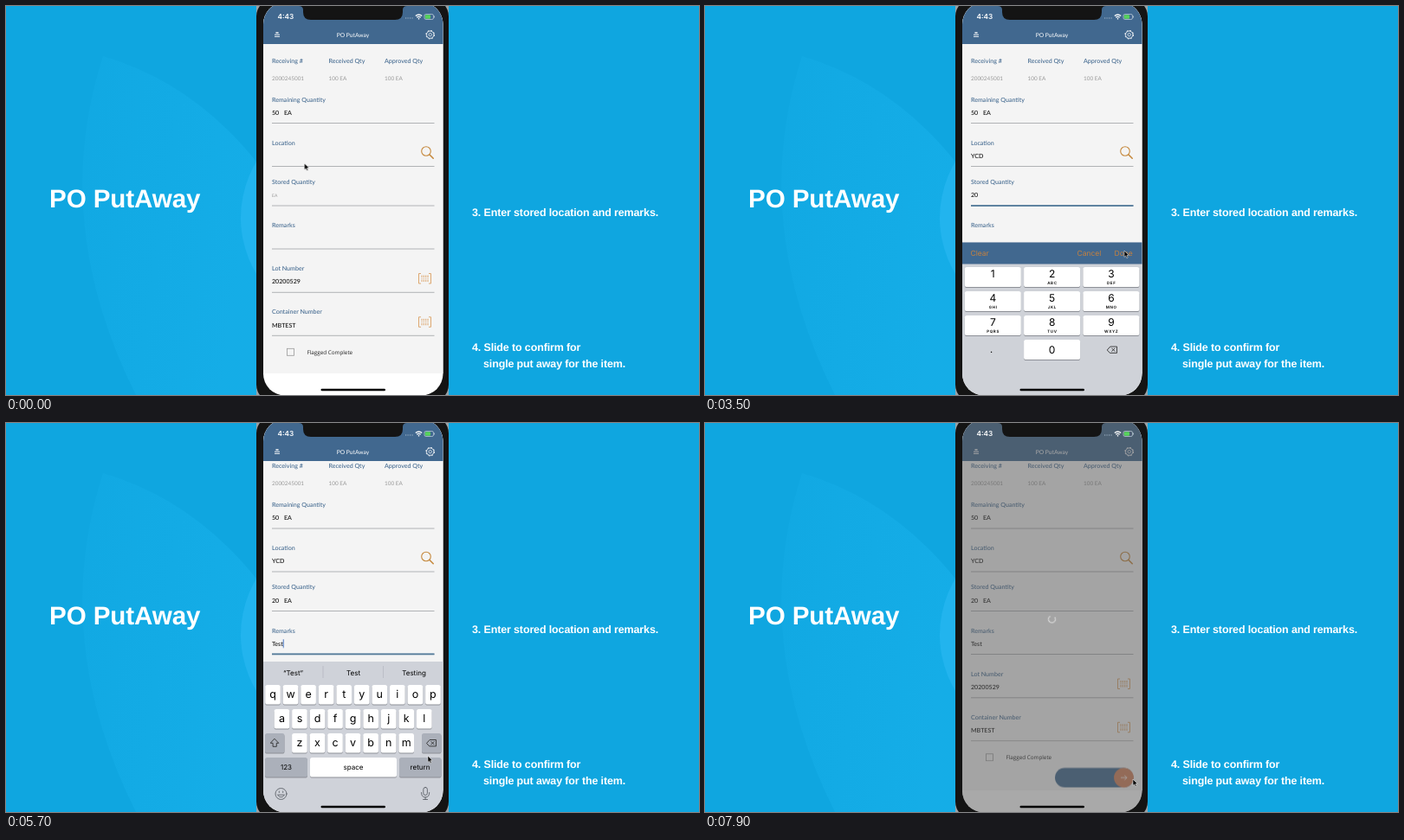
These frames come from a looping animation (800x450 px, 8000 ms). An HTML page:

```html
<!DOCTYPE html>
<html lang="en">
<head>
<meta charset="utf-8">
<title>PO PutAway</title>
<style>
html, body { margin: 0; width: 100%; height: 100%; overflow: hidden; background: #0fa6e0; }
svg { display: block; width: 800px; height: 450px; text-rendering: geometricPrecision; }
text { font-family: Lato, sans-serif; font-size: 7.1px; }
.big { font: bold 29.6px "Liberation Sans", sans-serif; fill: #fff; letter-spacing: -.1px; }
.note { font: bold 12.5px "Liberation Sans", sans-serif; fill: #fff; letter-spacing: -.14px; }
.label { fill: #41688f; font-weight: 500; }
.value { fill: #111; font-weight: 500; }
.dim { fill: #9a9a9a; font-size: 6.4px; }
.open { font-family: "Open Sans", sans-serif; font-size: 6.3px; fill: #222; }
.ui { font-family: Inter, sans-serif; }
.mid { text-anchor: middle; }
.rule { stroke: #a9abae; stroke-width: .9; }
.focus { stroke: #39698f; stroke-width: 1.4; }
.icon { fill: none; stroke: #dba063; stroke-width: .9; }
.pen { fill: none; stroke: #222; stroke-width: .8; stroke-linejoin: round; stroke-linecap: round; }

.t, .m { animation: 8s infinite; }
.t { animation-timing-function: step-end; }
.m { animation-timing-function: ease-in-out; }

@keyframes ycd { 0%, 1.2% { opacity: 0 } 8.7%, 100% { opacity: 1 } }
@keyframes unit { 0% { opacity: 1 } 31.9% { opacity: 0 } 100% { opacity: 0 } }
@keyframes two { 0% { opacity: 0 } 31.9% { opacity: 1 } 36.3% { opacity: 0 } 100% { opacity: 0 } }
@keyframes twenty { 0% { opacity: 0 } 36.3% { opacity: 1 } 100% { opacity: 1 } }
@keyframes twentyUnit { 0% { opacity: 0 } 44.9% { opacity: 1 } 100% { opacity: 1 } }
@keyframes qtyFocus { 0% { opacity: 0 } 18.6% { opacity: 1 } 44.9% { opacity: 0 } 100% { opacity: 0 } }
@keyframes noteFocus { 0% { opacity: 0 } 53.6% { opacity: 1 } 74.2% { opacity: 0 } 100% { opacity: 0 } }
@keyframes t1 { 0% { opacity: 0 } 59.4% { opacity: 1 } 62% { opacity: 0 } 100% { opacity: 0 } }
@keyframes t2 { 0% { opacity: 0 } 62% { opacity: 1 } 64.5% { opacity: 0 } 100% { opacity: 0 } }
@keyframes t3 { 0% { opacity: 0 } 64.5% { opacity: 1 } 67.4% { opacity: 0 } 100% { opacity: 0 } }
@keyframes t4 { 0% { opacity: 0 } 67.4% { opacity: 1 } 100% { opacity: 1 } }
@keyframes caret {
  0% { transform: none } 59.4% { transform: translateX(4.2px) } 62% { transform: translateX(7.8px) }
  64.5% { transform: translateX(10.6px) } 67.4%, 100% { transform: translateX(12.9px) }
}
@keyframes upper { 0% { opacity: 1 } 59.4% { opacity: 0 } 100% { opacity: 0 } }
@keyframes lower { 0% { opacity: 0 } 59.4% { opacity: 1 } 100% { opacity: 1 } }
@keyframes button { 0% { opacity: 0 } 58% { opacity: 1 } 100% { opacity: 1 } }

@keyframes scroll {
  0%, 53.3% { transform: none; animation-timing-function: linear }
  55% { transform: translateY(-2.4px); animation-timing-function: ease-out }
  58.5%, 100% { transform: translateY(-13.5px) }
}
@keyframes numpad {
  0%, 18.4% { transform: translateY(177px) }
  23.5%, 45% { transform: none }
  49.5%, 100% { transform: translateY(177px) }
}
@keyframes keyboard {
  0%, 52.5% { transform: translateY(174px); animation-timing-function: ease-in }
  55% { transform: translateY(102px); animation-timing-function: ease-out }
  58.5%, 74.2% { transform: none }
  78.7%, 100% { transform: translateY(174px) }
}
@keyframes slide { 0%, 88.7% { transform: none } 95%, 100% { transform: translateX(68px) } }
@keyframes hint { 0%, 89% { opacity: 1 } 93.5%, 100% { opacity: 0 } }
@keyframes shade { 0%, 95.3% { opacity: 0 } 97%, 100% { opacity: 1 } }
@keyframes spin { to { transform: rotate(360deg) } }
@keyframes pointer {
  0%, 1.2% { transform: translate(344.5px, 182px) }
  15%, 20% { transform: translate(332px, 227px) }
  30%, 32.5% { transform: translate(399px, 311px) }
  34.8%, 37.5% { transform: translate(399px, 394px) }
  43%, 45.5% { transform: translate(484px, 283px) }
  52%, 56% { transform: translate(337.5px, 272px) }
  58.8%, 59.8% { transform: translate(390px, 312px) }
  61.5%, 62.3% { transform: translate(349px, 312px) }
  64%, 65% { transform: translate(360px, 340px) }
  67%, 68% { transform: translate(390px, 312px) }
  71.2% { transform: translate(487px, 385px) }
  73%, 75% { transform: translate(482px, 393px) }
  81.2% { transform: translate(466.5px, 391px) }
  86%, 88.7% { transform: translate(416px, 407px) }
  95% { transform: translate(484px, 409px) }
  98.5%, 100% { transform: translate(494px, 412px) }
}
.spinner { transform-origin: 400.5px 227px; animation: spin 1s linear infinite; }
</style>
</head>
<body>
<svg viewBox="0 0 800 450">
  <defs>
    <clipPath id="screen"><rect x="297" y="-4" width="207.5" height="454.5" rx="25"/></clipPath>
    <clipPath id="page"><rect x="297" y="44" width="208" height="381"/></clipPath>
    <linearGradient id="haze" x1="0" y1="0" x2="1" y2=".3">
      <stop offset="0" stop-color="#17b0ea" stop-opacity=".25"/>
      <stop offset="1" stop-color="#17b0ea" stop-opacity=".7"/>
    </linearGradient>
  </defs>

  <rect width="800" height="450" fill="#0fa6e0"/>
  <path d="M112 58Q215 88 289 180V450H150Q50 250 112 58Z" fill="url(#haze)"/>
  <circle cx="397" cy="245" r="126" fill="#22b4ee"/>
  <rect x="511" width="289" height="450" fill="#0fa6e0"/>

  <text class="big" x="50" y="233">PO PutAway</text>
  <text class="note" x="538" y="242.5">3. Enter stored location and remarks.</text>
  <text class="note" x="538" y="399">4. Slide to confirm for</text>
  <text class="note" x="551" y="417.5">single put away for the item.</text>

  <rect x="289" width="222" height="450" fill="#9aa3a8"/>
  <rect x="289" y="-8" width="222" height="466" rx="20" fill="#141414"/>

  <g clip-path="url(#screen)">
    <rect x="297" width="208" height="450" fill="#fff"/>
    <rect x="297" width="208" height="425" fill="#f4f4f4"/>

    <g clip-path="url(#page)">
      <g class="m" style="animation-name:scroll">
        <g id="form"></g>
        <g class="icon" style="stroke:#c68a3f;stroke-width:1.1">
          <circle cx="485" cy="168" r="5.3"/>
          <path d="M489 172l4.2 4.2" stroke-width="1.6" stroke-linecap="round"/>
        </g>
        <text class="value m" x="307" y="175.7" style="animation-name:ycd">YCD</text>

        <text class="dim t" x="307" y="220.6" style="font-size:5px;animation-name:unit">EA</text>
        <text class="value t" x="307" y="221" style="animation-name:two">2</text>
        <text class="value t" x="307" y="221" style="animation-name:twenty">20</text>
        <text class="value t" x="321" y="221" style="animation-name:twentyUnit">EA</text>
        <path class="focus t" d="M307 231h187.500" style="animation-name:qtyFocus"/>

        <text class="value t" x="307" y="271.2" style="animation-name:t1">T</text>
        <text class="value t" x="307" y="271.2" style="animation-name:t2">Te</text>
        <text class="value t" x="307" y="271.2" style="animation-name:t3">Tes</text>
        <text class="value t" x="307" y="271.2" style="animation-name:t4">Test</text>
        <g class="t" style="animation-name:noteFocus">
          <path class="focus" d="M307 280.800h187.500"/>
          <rect class="t" x="306.800" y="263.500" width="1" height="10" fill="#3f6fc0" style="animation-name:caret"/>
        </g>

        <rect x="324.500" y="396.300" width="8" height="8" fill="none" stroke="#999" stroke-width=".8"/>
        <text class="open" x="347.500" y="402.800">Flagged Complete</text>

        <g class="t" style="animation-name:button">
          <rect x="404" y="412.500" width="90.500" height="22.500" rx="11.250" fill="#41688f"/>
          <text class="open m" x="432" y="426.300" style="font-size:7.25px;fill:#fff;animation-name:hint">Slide to confirm</text>
          <g class="m" style="animation-name:slide">
            <circle cx="415.500" cy="423.800" r="11.400" fill="#d3805a"/>
            <path d="M412 423.800h7m-2.700-2.700l2.700 2.700l-2.700 2.700" fill="none" stroke="#fff" stroke-width=".8"/>
          </g>
        </g>
      </g>
    </g>

    <rect x="297" width="208" height="44" fill="#41688f"/>
    <text class="mid" x="400.500" y="36" fill="#fff" style="font-size:6.7px">PO PutAway</text>
    <path d="M311.500 31h3M310 33.200h6M310 35.400h6M311.500 30.900h3" stroke="#fff" stroke-width=".9"/>
    <g fill="none" stroke="#fff">
      <circle cx="489.700" cy="33.200" r="4.200" stroke-width=".8"/>
      <circle cx="489.700" cy="33.200" r="4.800" stroke-width="1" stroke-dasharray="1.900 1.870"/>
      <circle cx="489.700" cy="33.200" r="1.700" stroke-width=".7"/>
    </g>

    <g class="m" style="animation-name:numpad">
      <rect x="297" y="273.500" width="208" height="177" fill="#cfd2d8"/>
      <rect x="297" y="273.500" width="208" height="25" fill="#41688f"/>
      <g class="ui" fill="#c5803f">
        <text class="ui" x="306.500" y="289" style="font-size:8.5px">Clear</text>
        <text class="ui" x="429.500" y="289" style="font-size:8.5px">Cancel</text>
        <text class="ui" x="472.500" y="289" style="font-size:8.5px">Done</text>
      </g>
      <g id="pad"></g>
      <text class="ui mid" x="330.500" y="400.500" style="font-size:11px">.</text>
      <path class="pen" d="M464.500 397.700l3.300-3.700h7.700v7.400h-7.700zM469.700 396l3.400 3.400m0-3.400l-3.400 3.400"/>
    </g>

    <g class="m" style="animation-name:keyboard">
      <rect x="297" y="276" width="208" height="175" fill="#cfd2d9"/>
      <g class="t" style="animation-name:t4">
        <path d="M366 281v14M435.500 281v14" stroke="#b3b7bf" stroke-width=".7"/>
        <text class="ui mid" x="331.500" y="291.500" style="font-size:8px">“Test”</text>
        <text class="ui mid" x="401" y="291.500" style="font-size:8px">Test</text>
        <text class="ui mid" x="471" y="291.500" style="font-size:8px">Testing</text>
      </g>
      <g id="keys"></g>
      <g id="upper" class="t" style="animation-name:upper"></g>
      <g id="lower" class="t" style="animation-name:lower"></g>
      <path class="pen" d="M310.200 365.500l4.600 4.800h-2.500v4h-4.200v-4h-2.500z"/>
      <path class="pen" d="M485.800 370.200l3.300-3.700h7.400v7.400h-7.400zM490.800 368.500l3.400 3.400m0-3.400l-3.400 3.400"/>
      <g class="pen" style="stroke:#50555c">
        <circle cx="317.500" cy="429" r="6.500"/>
        <path d="M313.700 430.500q3.800 5 7.600 0zM315.300 426v1.500M319.700 426v1.500"/>
        <rect x="481.800" y="421.500" width="4.600" height="9" rx="2.300"/>
        <path d="M479.500 427.500q0 5.500 4.600 5.500t4.600-5.500M484.100 433v2.500m-2.500 0h5"/>
      </g>
    </g>

    <g class="m" style="animation-name:shade">
      <rect x="297" width="208" height="450" fill="#565656" fill-opacity=".51"/>
      <g class="spinner">
        <circle cx="400.500" cy="227" r="4" fill="none" stroke="#dcdcdc" stroke-width="1.200" stroke-dasharray="19 6.130"/>
      </g>
    </g>

    <text class="ui" x="313.500" y="15.300" fill="#fff" style="font-size:8.2px;font-weight:600">4:43</text>
    <path d="M461 14h9" stroke="#a9bccf" stroke-width="1" stroke-dasharray="1.200 1.300"/>
    <g fill="none" stroke="#fff" stroke-width="1.300">
      <path d="M472.800 11.600q3.700-3.200 7.400 0M474.300 13.300q2.200-1.900 4.400 0"/>
      <path d="M476.500 14v1.400"/>
    </g>
    <rect x="483" y="9.500" width="10.500" height="6" rx="1.700" fill="none" stroke="#c9d6e2" stroke-width=".7"/>
    <rect x="483.800" y="10.300" width="6.200" height="4.400" rx="1" fill="#57d35c"/>
    <path d="M494.600 11.500v2" stroke="#c9d6e2" stroke-width=".8"/>
    <rect x="363.500" y="442.800" width="74.500" height="2.400" rx="1.200" fill="#000"/>
  </g>

  <path d="M338 0q5 0 5 4.500V7q0 9 9 9h97q9 0 9-9V4.500q0-4.500 5-4.500z" fill="#141414"/>

  <path class="m" d="M0 0v7.400l1.700-1.500 1.200 2.700 1.300-.6-1.200-2.600h2.300z" fill="#000" stroke="#fff" stroke-width=".5" style="animation-name:pointer"/>
</svg>

<script>
const put = (id, markup) => document.getElementById(id).innerHTML += markup;
const text = (x, y, s, cls, style = '') => `<text class="${cls}" x="${x}" y="${y}" style="${style}">${s}</text>`;
const key = (x, y, w, fill = '#fff', h = 22.5) =>
  `<rect x="${x}" y="${y + 1}" width="${w}" height="${h}" rx="2.6" fill="#8d9097"/>` +
  `<rect x="${x}" y="${y}" width="${w}" height="${h}" rx="2.6" fill="${fill}"/>`;
const scanIcon = y => `<g class="icon" transform="translate(476 ${y})">
  <path d="M3 0H.5V11.500H3M12 0h2.500V11.500H12"/>
  <path d="M4 2v7.500M6.300 2v7.500M8.700 2v7.500M11 2v7.500" stroke-dasharray="2.500 .8 1 .8"/></g>`;

// Form: summary columns, then [label, label y, rule y, value, unit]
[['Receiving #', 307, '2000245001'], ['Received Qty', 372.5, '100 EA'], ['Approved Qty', 437, '100 EA']]
  .forEach(([name, x, v]) => put('form', text(x, 65.7, name, 'label') + text(x, 85.8, v, 'dim')));
[['Remaining Quantity', 110.5, 135.5, '50', 'EA'], ['Location', 160.6, 185.5], ['Stored Quantity', 205.8, 231],
 ['Remarks', 256, 281], ['Lot Number', 306, 331.3, '20200529'], ['Container Number', 356.3, 381.3, 'MBTEST']]
  .forEach(([name, y, line, v = '', unit = '']) => put('form',
    text(307, y, name, 'label') + text(307, y + 15.2, v, 'value') + text(321, y + 15.2, unit, 'value') +
    `<path class="rule" d="M307 ${line}h187.500"/>`));
put('form', scanIcon(309.5) + scanIcon(359.8));

// Number pad
['', 'ABC', 'DEF', 'GHI', 'JKL', 'MNO', 'PQRS', 'TUV', 'WXYZ'].forEach((letters, i) => {
  const x = 299.8 + i % 3 * 68.3, y = 302 + Math.floor(i / 3) * 28;
  put('pad', key(x, y, 65, '#fff', 23) +
    text(x + 32.5, y + 12.2, i + 1, 'ui mid', 'font-size:12px') +
    text(x + 32.8, y + 20, letters, 'ui mid', 'font-size:4.5px;font-weight:600;letter-spacing:.6px'));
});
put('pad', key(368.1, 386, 65, '#fff', 23) + text(400.6, 402, '0', 'ui mid', 'font-size:12px'));

// Letter keyboard
const grey = '#abb0ba';
put('keys', key(299, 359, 22.5, grey) + key(480, 359, 22.5, grey) +
  key(299, 387, 49, grey) + key(351, 387, 100) + key(454, 387, 48.5, grey) +
  text(323.5, 401, '123', 'ui mid', 'font-size:8px') +
  text(401, 401, 'space', 'ui mid', 'font-size:8px') +
  text(478, 401, 'return', 'ui mid', 'font-size:8px'));
put('upper', key(299, 359, 22.5));
['qwertyuiop', 'asdfghjkl', 'zxcvbnm'].forEach((row, r) => [...row].forEach((c, i) => {
  const x = [308, 318.4, 338.9][r] + i * 20.55, y = 303 + r * 28;
  put('keys', key(x - 8.8, y, 17.6));
  put('upper', text(x, y + 15.6, c.toUpperCase(), 'ui mid', 'font-size:12px'));
  put('lower', text(x, y + 14.6, c, 'ui mid', 'font-size:12.5px'));
}));
</script>
</body>
</html>
```
